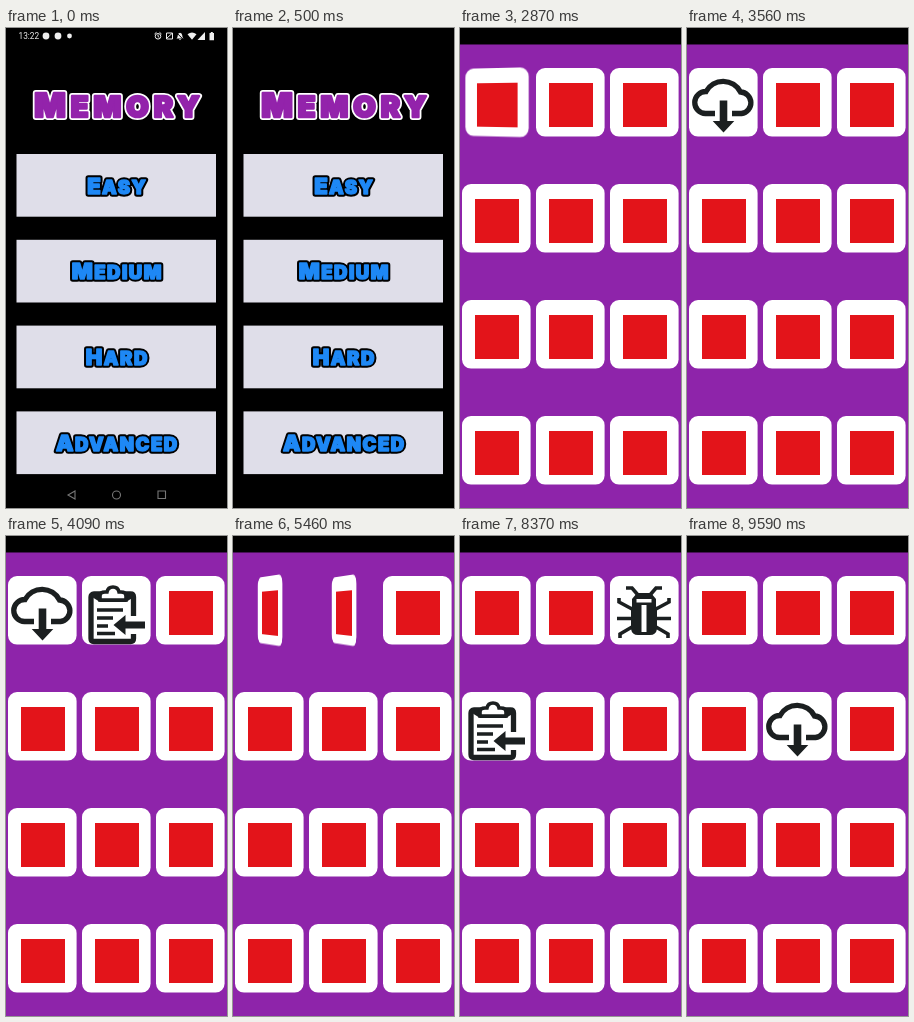
These frames come from a looping animation (221 by 480 pixels, 9630 ms). An HTML page:

```html
<!DOCTYPE html>
<html lang="en">
<head>
<meta charset="utf-8">
<title>Memory</title>
<style>
  html, body { margin: 0; width: 100%; height: 100%; overflow: hidden; background: #000; }
  #stage { position: relative; width: 221px; height: 480px; overflow: hidden; background: #000; }
  #menu, #game { position: absolute; left: 0; top: 0; width: 221px; height: 480px; }
  #game { background: linear-gradient(#000 16px, #4a1258 16px 17px, #8e24aa 17px); }
  .label { font: 900 18.5px Inter, sans-serif; letter-spacing: 1.5px; text-transform: uppercase;
    text-anchor: middle; stroke-linejoin: round; paint-order: stroke; }
  .label .cap { font-size: 22px; }
  .edge { fill: #000; stroke: #000; stroke-width: 5.5px; }
  .fill { fill: #1e88f5; stroke: #1e88f5; stroke-width: 1.5px; }
  .title { font-size: 29px; letter-spacing: 5px; }
  .title .cap { font-size: 33px; }
  .title.edge { fill: #fff; stroke: #fff; stroke-width: 6px; }
  .title.fill { fill: #9323ab; stroke: #9323ab; stroke-width: 2.5px; }
  .clock { font: 8.3px Roboto, sans-serif; fill: #eee; }
  .card { position: absolute; width: 69px; height: 69px; }
  .card svg { position: absolute; left: 0; top: 0; }
  .ink { fill: none; stroke: #1b1f20; stroke-width: 5.3; }
  .thin { stroke-width: 3.6; }
  .solid { fill: #1b1f20; }
</style>
</head>
<body>
<div id="stage">
  <svg id="menu" viewBox="0 0 221 480">
    <defs><clipPath id="press"><rect x="10.5" y="126" width="199.5" height="63"/></clipPath></defs>
    <g id="status" fill="#eee">
      <text class="clock" x="12.5" y="11.2">13:22</text>
      <circle cx="40" cy="8" r="3.4"/>
      <circle cx="52" cy="8" r="3.4"/>
      <circle cx="63.5" cy="8" r="2.4"/>
      <g fill="none" stroke="#eee">
        <circle cx="152" cy="8.3" r="2.8"/>
        <path d="M152 6.5v2l1.3.8M148.5 6l2-1.7M155.5 6l-2-1.7M160.5 5h6v6h-6zM161 10l5-4.5"/>
      </g>
      <path d="M170.5 10.5q1.3-1 1.2-3 .3-2.5 2.3-2.8 2 .3 2.3 2.8-.1 2 1.2 3zM173 11h2l-1 1.2z"/>
      <path d="M170 4.2l8 8" stroke="#000" stroke-width="1"/>
      <path d="M181.5 6.3q4.5-3.4 9 0l-4.5 5.5zM199 4v8h-7.5z"/>
      <path d="M203.5 5h1.3v-1h2v1h1.2v7.2h-4.5z"/>
    </g>
    <g id="buttons"></g>
    <circle id="ripple" cx="110" cy="158" r="0" fill="#000" clip-path="url(#press)"/>
    <g id="labels"></g>
    <g id="nav" fill="none" stroke="#777" stroke-width="1.1">
      <path d="M69 463v8l-7-4zM152 463h7.5v7.5h-7.5z"/>
      <circle cx="110.5" cy="467" r="4"/>
    </g>
  </svg>
  <div id="game"></div>
</div>
<script>
const LOOP = 9630;
const $ = id => document.getElementById(id);
const clamp = v => Math.max(0, Math.min(1, v));
const span = (t, start, end) => clamp((t - start) / (end - start));

const FACES = {
  back: '<rect x="13" y="15" width="44" height="44" fill="#e3141a"/>',
  cloud: `<path class="ink" d="M26 45.5H16.5A11 11 0 0 1 17 23.5A19.5 19.5 0 0 1 51.5 24A10.8 10.8 0 0 1 52.5 45.5H43"/>
    <path class="solid" d="M30.7 32.5h7.6v20.5h7L34.5 64.5 23.7 53h7z"/>`,
  bug: `<path class="ink thin" d="M16 12h6l6 7M52 12h-6l-6 7M9 22v4l13 7M59 22v4l-13 7
      M7 42.5h15M61 42.5H46M10 62v-4l12-7M58 62v-4l-12-7"/>
    <path class="solid" d="M27 17h14l5 6v7l1 3v20q-1 6-7 6H28q-6 0-7-6V33l1-3v-7z"/>
    <path d="M26.5 23h15v3.5h-15zM31.5 29h5v27h-5z" fill="#fff"/>`,
  clipboard: `<path class="ink" d="M51.5 40V21q0-3-3-3H12q-3 0-3 3v41.500q0 3 3 3h36.500q3 0 3-3V58"/>
    <path class="solid" d="M10 17h42v4l-8 5H18l-8-5z"/>
    <path class="ink thin" style="fill:#fff" d="M18 24v-4q0-4 5-4h2q1-5 6-5t6 5h2q5 0 5 4v4z"/>
    <path class="ink thin" d="M15 34h26M15 42h16M15 50h11M15 57.500h18"/>
    <path class="solid" d="M31.500 49l12-10v6.500H63v7H43.500V59z"/>`
};

const face = name => `<svg width="69" height="69" viewBox="0 0 69 69">
  <rect width="68.6" height="68.6" rx="9" fill="#fff"/>${FACES[name]}</svg>`;

function addLabel(name, x, y, kind = '') {
  for (const layer of ['edge', 'fill']) {
    $('labels').innerHTML += `<text class="label ${kind} ${layer}" x="${x}" y="${y}">` +
      `<tspan class="cap">${name[0]}</tspan>${name.slice(1)}</text>`;
  }
}

addLabel('Memory', 113.5, 89, 'title');
['Easy', 'Medium', 'Hard', 'Advanced'].forEach((name, i) => {
  const y = 126 + i * 85.8;
  $('buttons').innerHTML += `<rect x="10.5" y="${y}" width="199.5" height="62.7" fill="#dfdee9"/>`;
  addLabel(name, 111.3, y + 39.5);
});

const hidden = { 0: 'cloud', 1: 'clipboard', 2: 'bug', 3: 'clipboard', 4: 'cloud' };
const cards = Array.from({ length: 12 }, (_, i) => {
  const el = document.createElement('div');
  el.className = 'card';
  el.style.left = 2.3 + (i % 3) * 73.7 + 'px';
  el.style.top = 40 + Math.floor(i / 3) * 116 + 'px';
  el.innerHTML = face('back') + (hidden[i] ? face(hidden[i]) : '');
  $('game').append(el);
  return el;
});

// start, end, card indices, face up?
const flips = [
  [2770, 3340, [0], true],
  [3560, 4090, [1], true],
  [5100, 5640, [0, 1], false],
  [5850, 6430, [2], true],
  [6820, 7400, [3], true],
  [8370, 8910, [2, 3], false],
  [9090, 9590, [4], true]
];

function turnOf(card, t) {
  let turn = 0;
  for (const [start, end, set, up] of flips) {
    if (t < start || !set.includes(card)) continue;
    const p = span(t, start, end) ** 1.2;
    turn = 180 * (up ? p : 1 - p);
  }
  return turn;
}

function drawMenu(t) {
  const out = span(t, 40, 500);
  const gone = out * out;
  $('status').setAttribute('transform', `translate(0 ${-16 * gone})`);
  $('nav').setAttribute('transform', `translate(0 ${26 * gone})`);
  $('status').style.opacity = $('nav').style.opacity = 1 - out;
  $('ripple').setAttribute('r', 110 * span(t, 1650, 1900));
  $('ripple').style.opacity = 0.12 * (1 - span(t, 1850, 2050));
}

function drawGame(t) {
  const p = 1 - (1 - span(t, 1850, 2050)) ** 2.25;
  const alpha = p < 0.5 ? p / 2 : p < 0.9 ? 0.25 + (p - 0.5) * 1.125 : 0.7 + (p - 0.9) * 3;
  const game = $('game').style;
  game.visibility = p > 0 ? 'visible' : 'hidden';
  game.opacity = alpha;
  game.transform = `translateY(${38.4 * (1 - p)}px)`;

  cards.forEach((el, i) => {
    const [back, front] = el.children;
    if (!front) return;
    const turn = turnOf(i, t);
    const open = turn >= 90;
    back.style.display = open ? 'none' : 'block';
    front.style.display = open ? 'block' : 'none';
    const angle = open ? 180 - turn : -turn;
    el.style.transform = angle ? `perspective(562px) rotateY(${angle}deg)` : 'none';
  });
}

const origin = performance.now();
function tick() {
  const t = (performance.now() - origin) % LOOP;
  drawMenu(t);
  drawGame(t);
  requestAnimationFrame(tick);
}
tick();
</script>
</body>
</html>
```
